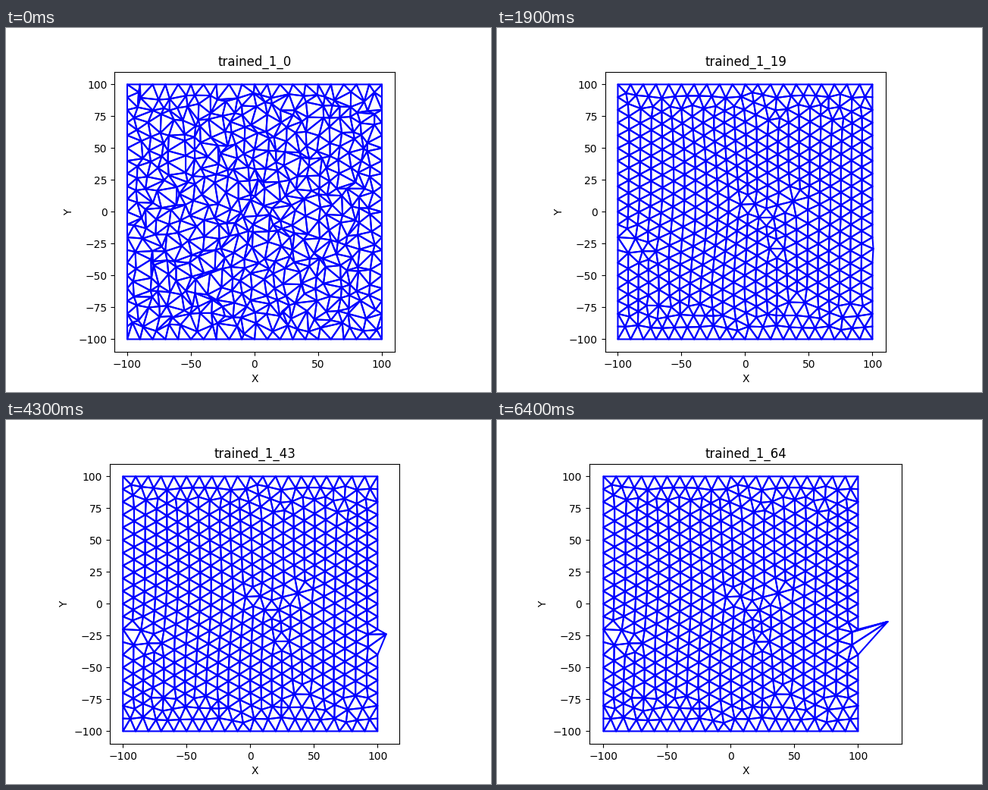
Write a matplotlib script that moves like this. It is 640 by 480 pixels and loops after 6.5 s.

```python
import numpy as np
import matplotlib.pyplot as plt
from matplotlib.animation import FuncAnimation
from matplotlib.collections import PolyCollection
from matplotlib.tri import Triangulation

FRAMES = 65
STEP_MS = 100
COLUMNS = 24
RATE = 0.2
LOOSE = (100, -30)  # border node that drifts away

# Path of the loose node: time step, x, y
DRIFT_T = [0, 10, 14, 21, 27, 36, 43, 51, 56, 64]
DRIFT_X = [100, 99.3, 100, 100.9, 102.4, 104.4, 106.8, 110, 114.3, 123.3]
DRIFT_Y = [-30, -29.8, -29.5, -28.8, -27.8, -25.3, -23.8, -21.2, -18.8, -14]

# Places where the lattice lacks a node
GAPS = [(42, 5), (83, -75), (36, -75), (-90, -25)]


def border_nodes():
    side = np.arange(-100, 101, 10)
    nodes = [(x, y) for x in side for y in (-100, 100)]
    nodes += [(x, y) for x in (-100, 100) for y in side[1:-1]]
    return np.array(nodes, float)


def inner_nodes():
    nodes = [(x, y) for x in range(-95, 96, 10) for y in (-91.5, 91.5)]
    for col in range(1, COLUMNS):
        x = -100 + 200 * col / COLUMNS
        if col % 2:
            ys = np.clip(np.arange(-85, 86, 10), -82, 82)
        else:
            ys = np.arange(-80, 81, 10)
        nodes += [(x, y) for y in ys]
    nodes = np.array(nodes, float)
    for gap in GAPS:
        near = np.argmin(np.hypot(*(nodes - gap).T))
        nodes = np.delete(nodes, near, axis=0)
    return nodes


def bend(nodes):
    """Lean the columns and tilt the rows gently, keeping the border still."""
    u, v = np.pi * nodes.T / 200
    edge = np.cos(u) * np.cos(v)
    dx = edge * (3 * np.cos(2 * v - 0.8) - 2 * np.sin(3 * u + 2 * v))
    dy = edge * (2 * np.sin(2 * u) + 1.5 * np.cos(4 * u + v))
    return nodes + np.column_stack([dx, dy])


def neighbour_mean(tri, count):
    a, b = tri.edges.T
    links = np.zeros((count, count))
    links[a, b] = links[b, a] = 1
    return links / links.sum(axis=1, keepdims=True)


def relax():
    """Node positions at every time step, from a shaken mesh to a smooth one."""
    rng = np.random.default_rng(7)
    border, inner = border_nodes(), bend(inner_nodes())
    fixed = len(border)
    inner += rng.uniform(-2.3, 2.3, inner.shape)
    nodes = np.vstack([border, inner])
    loose = np.argmin(np.hypot(*(nodes - LOOSE).T))

    for _ in range(4):
        tri = Triangulation(*nodes.T)
        mean = neighbour_mean(tri, len(nodes))
        nodes[fixed:] += 0.4 * (mean @ nodes - nodes)[fixed:]

    shake = rng.uniform(-3.6, 3.6, nodes[fixed:].shape)
    nodes[fixed:] = np.clip(nodes[fixed:] + shake, -96, 96)

    history = []
    for t in range(FRAMES):
        nodes[loose] = np.interp(t, DRIFT_T, DRIFT_X), np.interp(t, DRIFT_T, DRIFT_Y)
        history.append(nodes.copy())
        nodes[fixed:] += RATE * (mean @ nodes - nodes)[fixed:]
    return history, tri.triangles


history, triangles = relax()

fig, ax = plt.subplots(figsize=(6.4, 4.8), dpi=100)
ax.set_aspect("equal", adjustable="box")
ax.set_xlabel("X")
ax.set_ylabel("Y")
ax.set_ylim(-110, 110)
mesh = PolyCollection([], facecolors="none", edgecolors="blue",
                      linewidths=1.5, joinstyle="round")
ax.add_collection(mesh, autolim=False)
title = ax.set_title("")


def draw(t):
    nodes = history[t]
    mesh.set_verts(nodes[triangles])
    right = nodes[:, 0].max()
    pad = 0.05 * (right + 100)
    ax.set_xlim(-100 - pad, right + pad)
    title.set_text(f"trained_1_{t}")
    return mesh, title


anim = FuncAnimation(fig, draw, frames=FRAMES, interval=STEP_MS,
                     repeat=True, repeat_delay=0)
plt.show()
```
